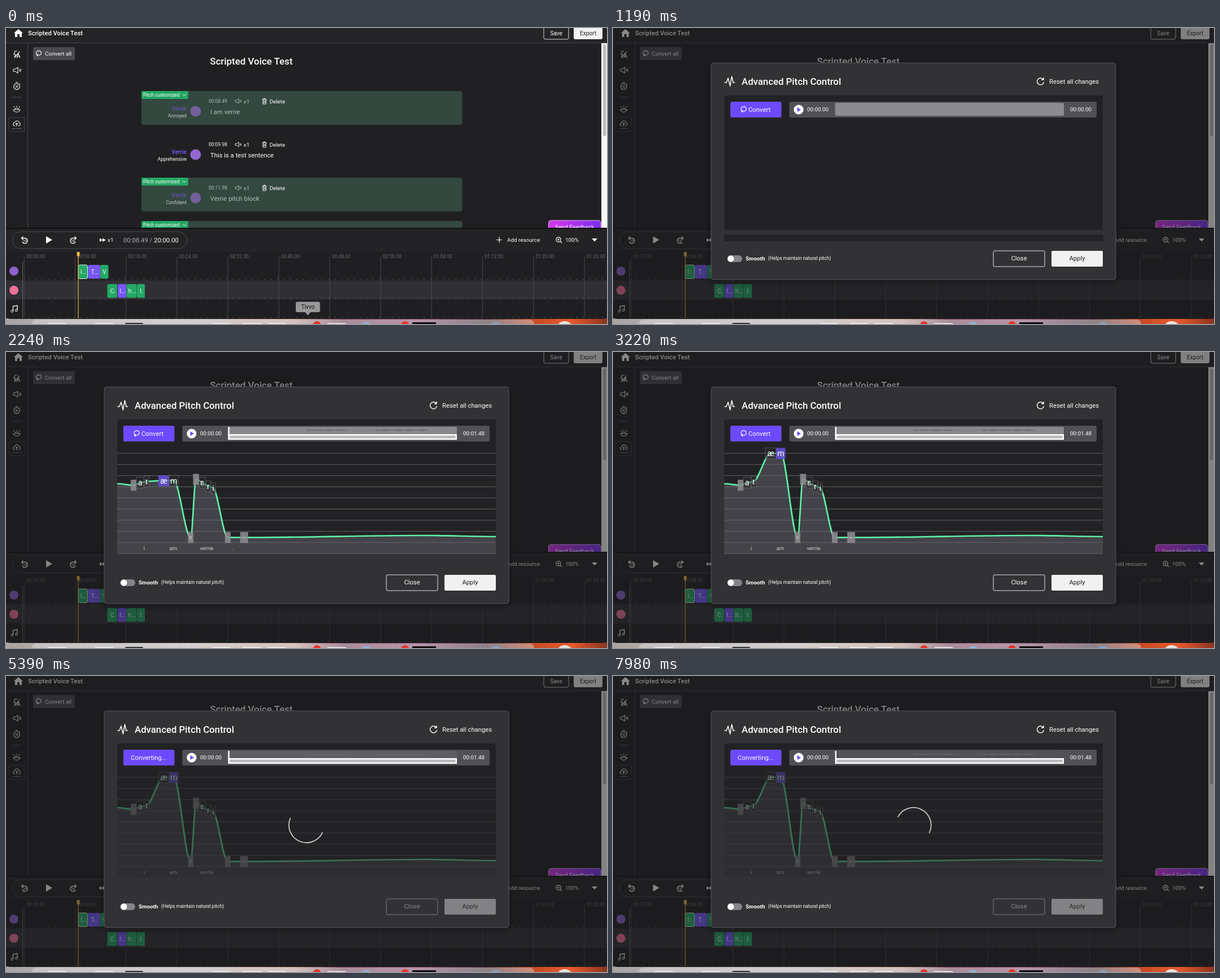
These frames come from a looping animation (1065 px wide and 526 px high, 8 s). An HTML page:

```html
<!DOCTYPE html>
<html>
<head>
<meta charset="utf-8">
<style>
html, body { margin: 0; width: 100%; height: 100%; overflow: hidden; background: #202022; }
svg { display: block; width: 1065px; height: 526px; font-family: Roboto, sans-serif; }
</style>
</head>
<body>
<script>
const STEP = 70, LOOP = 8000;

// ---- drawing helpers (text y is the vertical centre) ----
const R = (x, y, w, h, fill, more = '') => `<rect x="${x}" y="${y}" width="${w}" height="${h}" fill="${fill}" ${more}/>`;
const T = (x, y, s, size, fill = '#fff', more = '') =>
  `<text x="${x}" y="${y + size * .355}" font-size="${size}" fill="${fill}" ${more}>${s}</text>`;
const C = (x, y, r, fill, more = '') => `<circle cx="${x}" cy="${y}" r="${r}" fill="${fill}" ${more}/>`;
const L = (d, stroke = '#fff', w = 1, more = '') => `<path d="${d}" fill="none" stroke="${stroke}" stroke-width="${w}" ${more}/>`;
const F = (d, fill = '#fff') => `<path d="${d}" fill="${fill}"/>`;
const G = (x, y, s, k = 1) => `<g transform="translate(${x} ${y}) scale(${k})">${s}</g>`;
const mid = 'text-anchor="middle"', end = 'text-anchor="end"', bold = 'font-weight="500"';
const each = (n, f) => Array.from({ length: n }, (_, i) => f(i)).join('');

// value at time t on a polyline of [time, value] pairs
function track(t, keys) {
  let i = 1;
  while (i < keys.length - 1 && t > keys[i][0]) i++;
  const [a, u] = keys[i - 1], [b, v] = keys[i];
  return u + (v - u) * Math.min(1, Math.max(0, (t - a) / (b - a)));
}

// ---- icons ----
const bubble = L('M-3.5 5V2.6A4.6 4.2 0 1 1 1 4H-3M-1.5 2.2L-3.5 4.2-1.5 6', '#fff', 1.2);
const speaker = L('M-6-2H-3L2-5V5L-3 2H-6ZM4.5-2Q6 0 4.5 2M6.5-3Q8 0 6.5 3', 'currentColor', 1.1);
const trash = L('M-4-3H4M-1.5-3V-4.7H1.5V-3M-3-3L-2.6 5H2.6L3-3M-1-1V3M1-1V3', '#fff', 1);
const skip = flip => `<g transform="scale(${flip} 1)">${L('M-5-3H1A4.6 4.6 0 1 1-4 3M-2.5-6L-5.5-3-2.5 0', '#fff', 1.3)}</g>` + T(flip * .7, 1.2, 15, 5.5, '#fff', mid + bold);
const sidebar =
  G(19, 47, L('M1-6H-3L-5 0H-2L-4 6 5-5M0 6L3-1 6 6M1 4H5', '#eee', 1.2)) +
  G(19, 75, '<g color="#eee">' + speaker + '</g>') +
  G(19, 103, C(0, 1, 5.3, 'none', 'stroke="#eee" stroke-width="1.2"') + L('M-2-6.5H2M5-4.5L6-3.5M-1.2-1V3M1.2-1V3', '#eee', 1.2)) +
  R(11, 122.5, 16, 1, '#555459') +
  G(19, 144, L('M-6 1H6Q5 5.5 0 5.5T-6 1ZM-3 1Q-3-2 0-2T3 1M0-4V-6M-4-3L-5.5-4.5M4-3L5.5-4.5', '#eee', 1.1)) +
  R(5, 159, 27.5, 25, 'none', 'rx="2" stroke="#45444a"') +
  G(19, 170, L('M-3 4H-4Q-7 3-6 0-5-2-3.5-2-2-5.5 1-5T4-2Q7-1 6 2 5 4 3 4M0 5V-1M-2 1L0-1 2 1', '#eee', 1.1)) +
  R(10, 178, 18, 1.5, '#55545a');

// ---- editor ----
function row(y, mood, line, card) {
  const soft = card ? '#b4beb9' : '#fff';
  return (card ? R(240, y - 18, 568.5, 60, '#33483f', 'rx="4"') + tag(y - 18) : '') +
    T(359, y, card, 8.5, soft).replace('>' + card, '>' + (card || '00:09.98')) +
    `<g color="${soft}">${G(411, y, speaker, .8)}</g>` + T(421, y, 'x1', 9.9, soft) +
    G(458, y, trash) + T(467, y, 'Delete', 9.9) +
    T(320, y + 13, 'Verrie', 10, card ? '#6551b0' : '#7a55ff', end + ' ' + bold) +
    T(320, y + 25.5, mood, 8.5, card ? '#c4ccc8' : '#fff', end) +
    C(336, y + 18, 9.5, card ? '#73609a' : '#9468cf') +
    T(362, y + 18.5, line, 11.3, soft);
}
const tag = y => R(240, y, 83, 14, '#24a865', 'rx="2"') + T(243, y + 7, 'Pitch customized', 8.4) +
  L(`M313 ${y + 5.5}L316 ${y + 8.5} 319 ${y + 5.5}`);

const editor =
  R(0, 0, 1065, 526, '#202022') + R(0, 0, 1065, 26, '#242427') + R(0, 26, 1065, 1, '#47464b') + R(38, 26, 1, 330, '#47464b') +
  F('M14 9L22 2 30 9H28V16H24V11H20V16H16V9Z') +
  T(39, 9, 'Scripted Voice Test', 11.2, '#fff', bold) +
  R(953, -4, 44, 24, 'none', 'rx="3" stroke="#ddd"') + T(975, 9, 'Save', 10.1, '#fff', mid) +
  R(1006, -4, 51, 24, '#f2f2f2', 'rx="3"') + T(1031.5, 9, 'Export', 10.1, '#222', mid) +
  sidebar +
  R(48, 34, 74, 23, '#4a494e', 'rx="2"') + G(58, 44.5, bubble, .95) + T(69, 45.5, 'Convert all', 9.95) +
  T(361.5, 59.5, 'Scripted Voice Test', 16.9, '#fff', bold) +
  row(130, 'Annoyed', 'I am verrie', '00:08.49') +
  row(207, 'Apprehensive', 'This is a test sentence', '') +
  row(284, 'Confident', 'Verrie pitch block', '00:11.98') +
  R(240, 343, 568.5, 20, '#33483f', 'rx="4"') + tag(343) +
  R(1055, 27, 10, 329, '#f7f7f7') + R(1058, 29, 5.5, 163, '#bcbcbc', 'rx="2.7"') +
  R(961.5, 342, 92.5, 24, 'url(#pink)', 'rx="4" stroke="#e6b8ff"') + T(1007.5, 354.5, 'Send Feedback', 10.2, '#fff', mid);

// ---- transport and timeline ----
const clip = (x, w, y, color, s, more = '') => R(x, y, w, 24.5, color, 'rx="2.5" ' + more) + T(x + w / 2 + 1, y + 12.5, s, 10, '#fff', mid);
const green = '#24a865', violet = '#7657fa';
const stamp = i => `0${Math.floor(i * 8 / 60)}:${String(i * 8 % 60).padStart(2, 0)}.00`;
const ticks = y => L(`M41 ${y}H1065`, '#57565b', 2.5, 'stroke-dasharray="1 10.28"');
const timeline =
  R(0, 355, 1065, 171, '#111112') + R(0, 357, 1065, 41, '#232325') +
  R(11, 362, 309.5, 30, 'none', 'rx="15" stroke="#4a494e"') +
  G(33, 376.5, skip(1)) + F('M71 370V383L82 376.5Z') + G(119, 376.5, skip(-1)) +
  F('M166 373.5V380L171 376.7ZM171 373.5V380L177 376.7Z') + T(180, 376.5, 'x1', 9.9) +
  T(208, 377, '00:08.49 / <tspan fill="#fff">20:00.00</tspan>', 11.3, '#aaa9ae') +
  L('M869 376.5H879M874 371.5V381.5', '#fff', 1.2) + T(888, 376.5, 'Add resource', 9.85) +
  C(979, 376, 4.2, 'none', 'stroke="#fff" stroke-width="1.2"') + L('M982 379L985 382M977 376H981M979 374V378', '#fff', 1.1) +
  T(991, 376.5, '100%', 9.9) + F('M1038 374H1048L1043 379.5Z') +
  R(0, 398, 1065, 118, '#1f1f21') + R(0, 448.5, 1065, 34, '#303034') +
  each(12, i => R(31.7 + i * 90.25, 406, 1, 110, '#49484d') + T(36 + i * 90.25, 406, stamp(i), 8.5, '#69686d')) +
  ticks(446.5) + ticks(480.5) + ticks(514.5) +
  R(29, 415, 1, 101, '#67666b') +
  C(14, 432, 8, '#8a62cc') + C(14, 466, 8, '#ee7397') +
  L('M12.5 503V494.5L20 493V501.5', '#fff', 1.3) + C(10.7, 503.3, 1.9, 'none', 'stroke="#fff"') + C(18.2, 501.8, 1.9, 'none', 'stroke="#fff"') +
  clip(128.2, 16.3, 421, green, 'I...', 'stroke="#dff7ea"') + clip(145.3, 21.5, 421, violet, 'T...') + clip(167, 14.5, 421, green, 'V.') +
  clip(179.5, 17.5, 455, green, 'C.') + clip(198, 15, 455, violet, 'I...') + clip(213.5, 18, 455, green, 'h...') + clip(232, 14, 455, green, 'I.') +
  R(127.4, 398, 1.3, 118, '#d9a842') + F('M125.5 398H130.5V404L128 407 125.5 404Z', '#efb943');

const dock = R(0, 516, 1065, 10, 'url(#desk)') + F('M0 510V516H1065V510Q1065 516 1058 517H7Q0 516 0 510', '#1b1b1d') +
  R(46, 518, 890, 20, '#e2e0df', 'rx="8" opacity=".45"') +
  [90, 174, 382, 436, 480, 586].map(x => R(x - 17, 524.5, 34, 4, '#f4f4f4', 'rx="2"')).join('') +
  R(211, 524, 32, 4, '#333', 'rx="2"') + R(720, 523, 42, 5, '#08080a') +
  C(638, 537, 14, '#8fb7dd') + C(868, 537, 14, '#7fa9d0') + C(990, 537, 16, '#e9e2e0') +
  C(551, 528, 7, '#e8362c') + C(707, 528, 7, '#e8362c');

const tip = R(513.5, 486.5, 43, 18.5, '#98989a', 'rx="3"') + F('M530 505H540L535 510.5Z', '#98989a') + T(535, 495.5, 'Tivvo', 10.2, '#161617', mid);

// ---- dialog ----
const dialog =
  R(0, 0, 1065, 516.5, '#19191b', 'opacity=".52"') +
  R(174, 62, 717, 385, '#333236', 'rx="4" stroke="#55545a" filter="url(#shade)"') +
  L('M197.500 97H201L204 89 207.500 103 210.500 86 213 97H216', '#fff', 1.5, 'stroke-linejoin="round"') +
  T(228, 95, 'Advanced Pitch Control', 16.75, '#fff', bold) +
  L('M762.5 91.500A6 6 0 1 0 763.5 96M763 88V92H759', '#fff', 1.4) + T(773, 95, 'Reset all changes', 11.25) +
  R(197, 120, 671, 239, '#222224', 'rx="3"') +
  R(208, 131, 90.5, 28, '#6d4aff', 'rx="2.5"') +
  R(312.5, 131, 544.5, 28, '#515055', 'rx="2.5"') + C(329, 145, 8.6, '#fff') + F('M326.5 141V149L333 145Z', '#6d4aff') +
  T(344, 144.5, '00:00.00', 9.8) +
  R(202.5, 404, 26.500, 12, '#85848a', 'rx="6"') + C(208.7, 410, 5.7, '#fff') +
  T(235, 409.5, 'Smooth', 9.8, '#fff', 'font-weight="600"') + T(275, 409.5, '(Helps maintain natural pitch)', 8.45);

const actions = R(674, 396, 91, 28, 'none', 'rx="2" stroke="#e4e4e6"') + T(719.5, 409.5, 'Close', 11.25, '#fff', mid) +
  R(777, 396, 91, 28, '#f1f1f2', 'rx="2"') + T(822.5, 409.5, 'Apply', 11.25, '#1d1d1f', mid);

// monotone cubic through points
function smooth(p) {
  const s = p.slice(1).map((q, i) => (q[1] - p[i][1]) / (q[0] - p[i][0]));
  const m = p.map((_, i) => s[i - 1] * s[i] > 0 ? 2 * s[i - 1] * s[i] / (s[i - 1] + s[i]) : 0);
  return 'M' + p[0] + p.slice(1).map((q, i) => {
    const [x, y] = p[i], d = (q[0] - x) / 3;
    return `C${x + d} ${y + d * m[i]} ${q[0] - d} ${q[1] - d * m[i + 1]} ${q}`;
  }).join('');
}

function chart(t) {
  const up = track(t, [[2380, 0], [2590, 48.5]]), up2 = track(t, [[3080, 0], [3220, 48.5]]);
  // left, width, top, symbol, state: 0 open, 1 silent, 2 held
  const cells = [
    [221, 10, 227, '', 1], [231, 13.5, 222.5, 'a', 0], [244.5, 9, 220.5, 'ɪ', t >= 1890 && t < 2030 ? 2 : 0],
    [270, 19, 219 - up, 'æ', t >= 2240 && t < 2590 ? 2 : 0], [289, 16.500, 219 - up2, 'm', t >= 2800 ? 2 : 0],
    [322.500, 9.500, 320, 'v', 1], [331.5, 10.5, 216.5, '', 1], [342, 12, 222.5, 'ɛ', 0], [354, 9, 229, 'r', 0], [363, 8.500, 232, 'i', 0],
    [388, 10, 320, '', 1], [415, 14, 320, '~', 1]
  ];
  const pts = [[197, 234], ...cells.map(c => [c[0] + c[1] / 2, c[2] + 9.7]), [740, 326], [868, 328]];
  const d = smooth(pts);
  return each(10, i => R(197, 179.500 + i * 19.8, 671, 1.2, '#58575c')) +
    `<path d="${d}V358H197Z" fill="#6c6b75" opacity=".45"/>` +
    L(d, '#5ff0a5', 2.7, 'stroke-linejoin="round"') +
    cells.map(([x, w, y, s, k]) =>
      R(x, y, w, 19.5, ['#29292c', '#8b8a8f', '#6350d8'][k], k ? 'opacity=".88"' : 'opacity=".55" stroke="#77767b"') +
      T(x + w / 2, y + 9.500, s, k == 1 ? 10 : 14.5, k == 1 ? '#ccc' : '#fff', mid)).join('') +
    [[245, 'i'], [296.5, 'am'], [355.5, 'verrie'], [402, '.']].map(([x, s]) => T(x, 348.5, s, 9.8, '#d4d4d6', mid)).join('');
}

const wave = L(each(108, i => {
  const x = 533 + i * 2, e = x < 605 ? 1 : x > 653 ? 1.1 : .25;
  const h = e * (.5 + .9 * Math.abs(Math.sin(i * 1.7) * Math.cos(i * .31)));
  return `M${x} ${139 - h}V${139 + h}`;
}), '#67666b', 1.8);

function strip(t) {
  const g = t < 4270 ? 136 : track(t, [[4270, 60], [5390, 95], [6720, 103], [7980, 82]]);
  return R(393.5, 133, 405.500, 23, `rgb(${g},${g},${g + 4})`, 'rx="2"') + wave +
    R(393.5, 146, 405.500, 10, '#fff') + R(396, 148.5, 401, 5, '#bab9bb', 'rx="2.5"') + R(393.5, 133, 2.5, 14, '#fff');
}

function spinner(t) {
  const turn = track(t, [[4270, -18], [5390, 834], [6720, 1869], [7980, 2817]]);
  return `<g transform="translate(532.5 265) rotate(${turn})">${L('M0-31.2A31.2 31.2 0 0 1 0 31.2', '#d0d0d2', 1.7)}</g>`;
}

function popup(t) {
  const loaded = t >= 1400, busy = t >= 4270;
  return dialog +
    (busy ? T(253, 144.5, 'Converting...', 11.35, '#fff', mid) : G(231.5, 144, bubble) + T(240, 144.5, 'Convert', 11.3)) +
    (loaded ? strip(t) + chart(t) : R(393.5, 133, 405.500, 23, '#8c8b90', 'rx="2"') + R(197, 367, 672, 12, '#232325', 'rx="3"')) +
    T(810, 144.5, loaded ? '00:01.48' : '00:00.00', 9.8) +
    (busy ? R(197, 165, 671, 194, '#222224', 'opacity=".62"') + spinner(t) : '') +
    `<g opacity="${track(t, [[4200, 1], [4270, .83], [4550, .42]])}">${actions}</g>`;
}

document.body.innerHTML = `<svg viewBox="0 0 1065 526"><defs>
  <linearGradient id="pink"><stop stop-color="#d935ea"/><stop offset="1" stop-color="#7a30f2"/></linearGradient>
  <linearGradient id="desk"><stop stop-color="#aaa5a2"/><stop offset=".3" stop-color="#c4c0be"/><stop offset=".48" stop-color="#c9a99f"/>
  <stop offset=".56" stop-color="#7a4760"/><stop offset=".68" stop-color="#92557a"/><stop offset=".8" stop-color="#49333f"/>
  <stop offset=".88" stop-color="#c64c25"/><stop offset=".94" stop-color="#e85a2e"/><stop offset="1" stop-color="#8a3420"/></linearGradient>
  <filter id="shade"><feDropShadow dx="0" dy="4" stdDeviation="6" flood-opacity=".35"/></filter></defs>
  ${editor}${timeline}${dock}<g id="tip">${tip}</g><g id="popup"></g></svg>`;

const tipBox = document.getElementById('tip'), popupBox = document.getElementById('popup');
let last = -1;
function frame(now) {
  const t = Math.floor(now % LOOP / STEP) * STEP;
  if (t !== last) {
    last = t;
    tipBox.setAttribute('opacity', track(t, [[0, 1], [350, 0]]));
    popupBox.innerHTML = t >= 1190 ? popup(t) : '';
  }
  requestAnimationFrame(frame);
}
frame(0);
</script>
</body>
</html>
```
